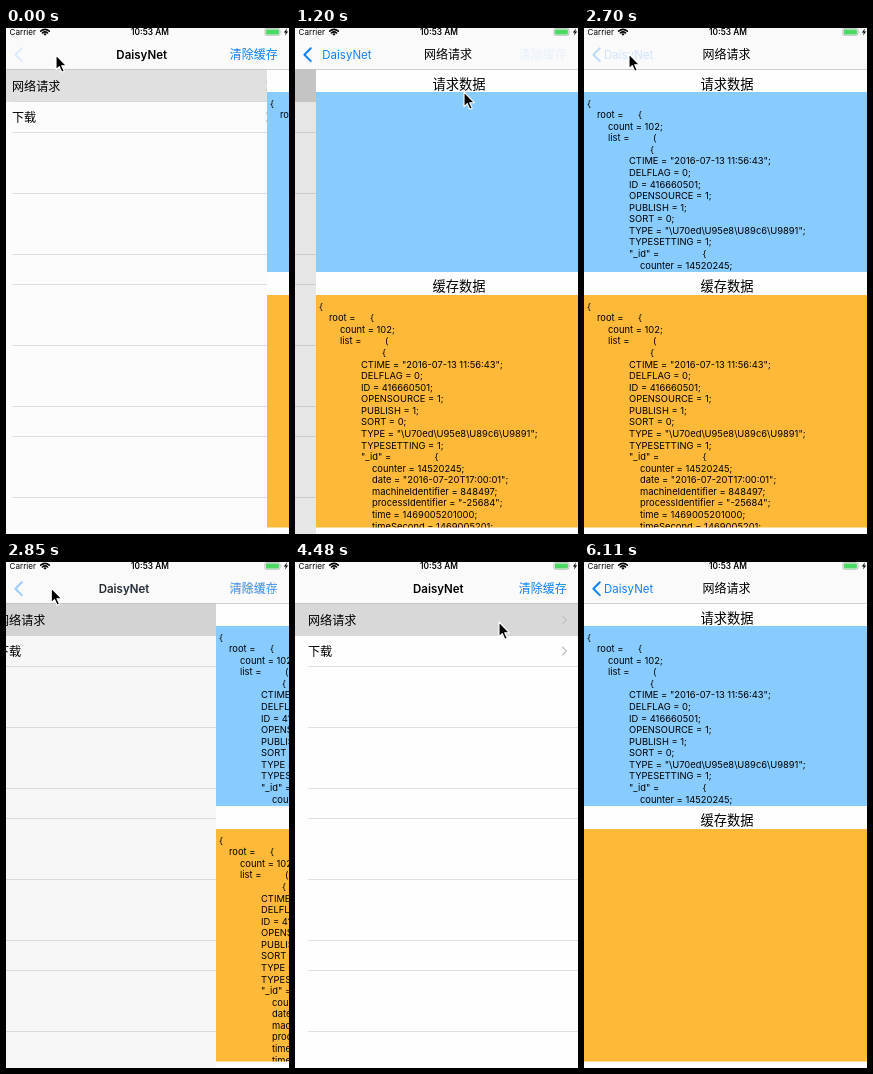
An HTML page for the animation above (6.43 s loop, 283 by 506 pixels).

```html
<!DOCTYPE html>
<html lang="zh-CN">
<head>
<meta charset="utf-8">
<title>DaisyNet</title>
<style>
  html, body { margin: 0; height: 100%; overflow: hidden; background: #fefefe; }
  svg { display: block; width: 100vw; height: 100vh; }
  text { font-family: Inter, "Noto Sans CJK SC", "Noto Sans CJK", sans-serif; white-space: pre; }
  .row { font-size: 12.1px; }
  .nav { font-size: 11.5px; }
  .navzh { font-size: 12px; }
  .bold { font-weight: 600; }
  .medium { font-weight: 500; }
  .mid { text-anchor: middle; }
  .head { font-size: 13.3px; text-anchor: middle; }
  .code { font-size: 9.37px; }
  .blue { fill: #0d82ff; }
  .line { fill: none; stroke-linecap: round; stroke-linejoin: round; }
</style>
</head>
<body>
<svg viewBox="0 0 283 506" preserveAspectRatio="none">
  <defs>
    <clipPath id="topClip"><rect y="64" width="283" height="180"/></clipPath>
    <clipPath id="lowClip"><rect y="267" width="283" height="232.5"/></clipPath>
  </defs>
  <rect width="283" height="506" fill="#fefefe"/>

  <g id="list">
    <g id="lines" fill="#e0e0e0"></g>
    <rect id="glow" y="41" width="283" height="33" fill="#d8d8d8"/>
    <text class="row" x="13" y="62.5">网络请求</text>
    <text class="row" x="13" y="93.6">下载</text>
    <path class="line" d="M267.5 54l4 4-4 4M267.5 85l4 4-4 4" stroke="#c4c4c9" stroke-width="1.4"/>
  </g>
  <rect id="dim" width="283" height="506"/>

  <g id="detail">
    <rect y="41" width="283" height="465" fill="#fefefe"/>
    <text class="head" x="143" y="61">请求数据</text>
    <rect y="64" width="283" height="180" fill="#88cbff"/>
    <text class="head" x="143" y="263.3">缓存数据</text>
    <rect y="267" width="283" height="232.5" fill="#ffb938"/>
    <g clip-path="url(#topClip)"><g id="fresh"></g></g>
    <g clip-path="url(#lowClip)"><g id="cached"></g></g>
  </g>

  <rect width="283" height="41" fill="#fafafa"/>
  <rect y="41" width="283" height="0.8" fill="#c2c2c2"/>
  <path id="arrow" class="line" d="M15.8 20.3l-6.4 6.4 6.4 6.4" stroke="#0d82ff" stroke-width="2"/>
  <text id="backText" class="nav blue" y="30.6">DaisyNet</text>
  <text id="listTitle" class="nav bold" y="30.6">DaisyNet</text>
  <text id="pageTitle" class="navzh medium mid" y="31">网络请求</text>
  <text id="clear" class="navzh blue" x="223.7" y="31">清除缓存</text>

  <text x="3.5" y="7.2" font-size="8.1">Carrier</text>
  <g class="line" stroke="#000" stroke-width="1.5" stroke-linecap="butt">
    <path d="M34.7 3.2q4.3-3.6 8.6 0M36.4 5q2.6-2.2 5.2 0"/>
  </g>
  <path d="M37.4 5.9q1.6-1.2 3.2 0L39 7.8z"/>
  <text class="bold mid" x="144" y="7.2" font-size="8.3">10:53 AM</text>
  <rect x="258.9" y="0.6" width="15" height="6.7" rx="1.3" fill="none" stroke="#999" stroke-width="0.6"/>
  <rect x="259.9" y="1.5" width="13" height="4.9" rx="0.6" fill="#4cd964"/>
  <path d="M274.8 2.8q1.2 1.1 0 2.3z" fill="#999"/>
  <path d="M281 0.6l-3.2 3.8h2l-.8 3 3.2-3.9h-2z"/>

  <path id="cursor" d="M0 0V14.6L3.3 11.6 5.8 17.2 8.2 16.1 5.7 10.7H10.3Z" stroke="#fff" stroke-width="1.1" stroke-linejoin="round"/>
</svg>
<script>
const W = 283, LOOP = 6430;
const POP1 = -230, PUSH1 = 967, POP2 = 2705, PUSH2 = 4505;
const $ = id => document.getElementById(id);
const NS = "http://www.w3.org/2000/svg";

function add(parent, tag, attrs, text) {
  const el = document.createElementNS(NS, tag);
  for (const key in attrs) el.setAttribute(key, attrs[key]);
  if (text) el.textContent = text;
  parent.appendChild(el);
}

for (const y of [73, 104, 165, 226, 256, 317, 378, 408, 469])
  add($("lines"), "rect", { x: 13, y, width: 270, height: 1 });

// Each line: left edge, text, then an optional bracket and its left edge.
const dump = [
  [3, "{"],
  [13, "root =", "{", 54],
  [24, "count = 102;"],
  [24, "list =", "(", 69],
  [66, "{"],
  [45, 'CTIME = "2016-07-13 11:56:43";'],
  [45, "DELFLAG = 0;"],
  [45, "ID = 416660501;"],
  [45, "OPENSOURCE = 1;"],
  [45, "PUBLISH = 1;"],
  [45, "SORT = 0;"],
  [45, 'TYPE = "\\U70ed\\U95e8\\U89c6\\U9891";'],
  [45, "TYPESETTING = 1;"],
  [45, '"_id" =', "{", 118.5],
  [56, "counter = 14520245;"],
  [56, 'date = "2016-07-20T17:00:01";'],
  [56, "machineIdentifier = 848497;"],
  [56, 'processIdentifier = "-25684";'],
  [56, "time = 1469005201000;"],
  [56, "timeSecond = 1469005201;"]
];

function print(group, top) {
  dump.forEach(([x, text, mark, markX], i) => {
    const y = top + i * 11.58;
    add(group, "text", { class: "code", x, y }, text);
    if (mark) add(group, "text", { class: "code", x: markX, y }, mark);
  });
}
print($("fresh"), 78.5);
print($("cached"), 281.6);

const clamp = v => Math.min(1, Math.max(0, v));
const ease = v => v * v * (3 - 2 * v);

// Critically damped spring: the part of the way still to go.
function left(ms) {
  const a = 0.01826 * Math.max(0, ms);
  const v = (1 + a) * Math.exp(-a);
  return v < 0.001 ? 0 : v;
}

// Share of the detail page on screen.
function shown(t) {
  if (t < PUSH1) return left(t - POP1);
  if (t < POP2) return 1 - left(t - PUSH1);
  if (t < PUSH2) return left(t - POP2);
  return 1 - left(t - PUSH2);
}

function rowGlow(t) {
  if (t >= 4460 || (t >= PUSH1 && t < POP2)) return 1;
  const since = t - (t < PUSH1 ? POP1 : POP2);
  return clamp(1 - (since / 295) ** 5);
}

// Pointer moves: start, end, target x and y.
const moves = [
  [0, 750, 169, 64],
  [1950, 2600, 45, 26],
  [2840, 3300, 253, 26],
  [3590, 4330, 204, 60],
  [5510, 6090, 287, 512]
];

function pointer(t) {
  let x = 50, y = 27;
  for (const [from, to, tx, ty] of moves) {
    const e = ease(clamp((t - from) / (to - from)));
    x += (tx - x) * e;
    y += (ty - y) * e;
  }
  return [x, y];
}

// The screen is sampled about seven times a second.
function sample(t) {
  if (t < 3900) return Math.floor(t / 150) * 150;
  return 3887 + Math.floor((t - 3887) / 147) * 147;
}

const shift = (id, x, y = 0) => $(id).setAttribute("transform", `translate(${x.toFixed(2)} ${y.toFixed(2)})`);
const fade = (id, v) => $(id).setAttribute("opacity", clamp(v).toFixed(3));

function draw(time) {
  const t = sample(time);
  const k = shown(t), x = Math.round(W * (1 - k));

  shift("list", Math.round(-0.3 * W * k));
  shift("detail", x);
  fade("dim", 0.1 * k);
  fade("glow", rowGlow(t));
  fade("fresh", t < PUSH1 || (t >= 1650 && t < PUSH2) || t >= 5200 ? 1 : 0);
  fade("cached", t >= PUSH1 && t < PUSH2 ? 1 : 0);

  const press = t >= 2690 && t < 2840 ? 0.18 : 1;
  const mix = clamp((k - 0.1) / 0.8);
  const labelX = 20 + 98 * (1 - k);
  shift("backText", labelX);
  shift("listTitle", labelX);
  shift("pageTitle", 142.5 + x / 2);
  fade("backText", mix * press);
  fade("listTitle", 1 - mix);
  fade("pageTitle", mix);
  fade("arrow", k * 1.5 * press);
  fade("clear", (1 - k) * (t >= 3450 && t < 3600 ? 0.25 : 1) + (k < 0.1 ? k : 0));

  shift("cursor", ...pointer(t));
}

const start = performance.now();
function tick() {
  draw((performance.now() - start) % LOOP);
  requestAnimationFrame(tick);
}
tick();
</script>
</body>
</html>
```
